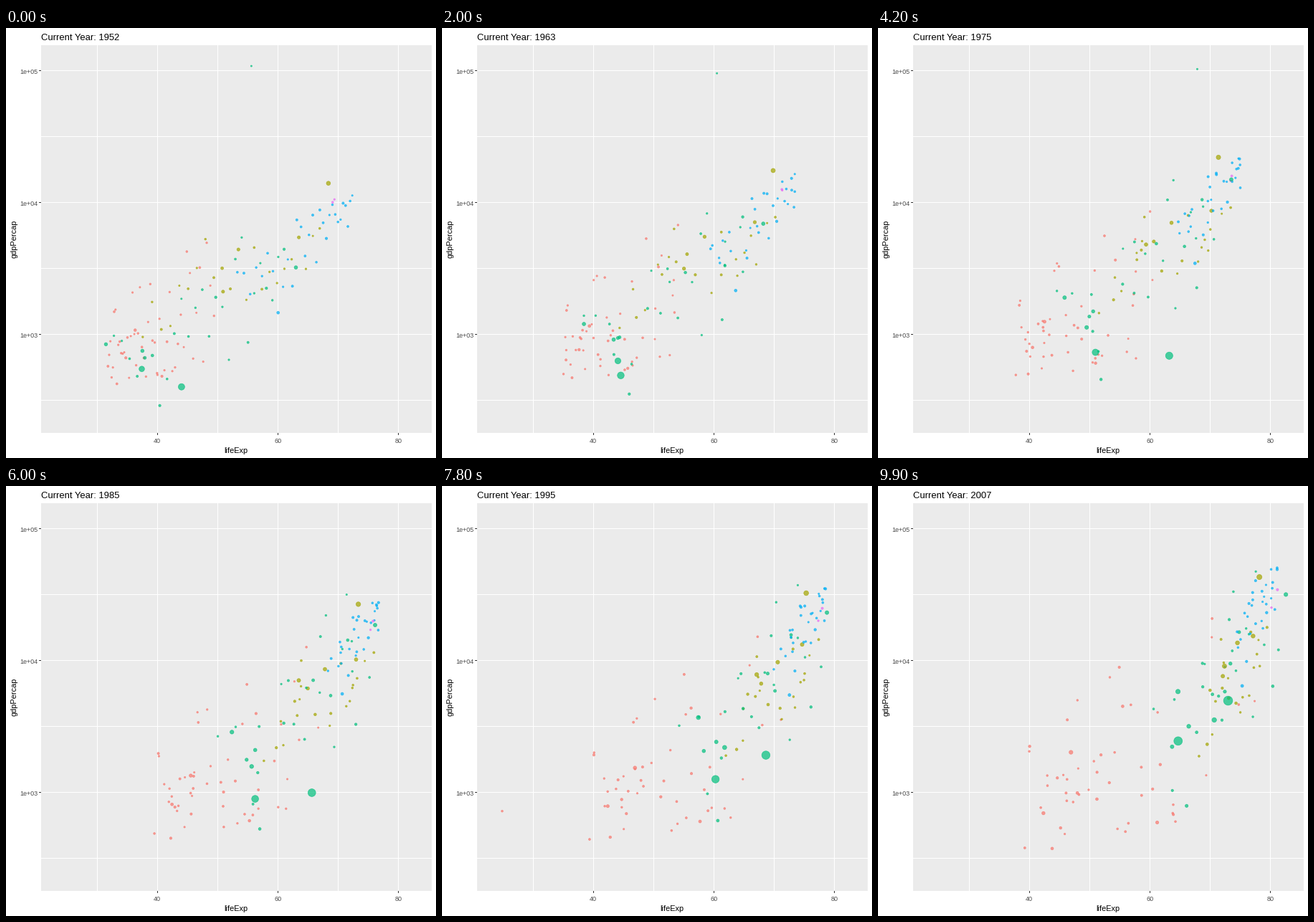
Recreate the animation shown at these times as a matplotlib script. Size 600x600 px, loop 10 s.

```python
import numpy as np
import matplotlib.pyplot as plt
from matplotlib.animation import FuncAnimation
from matplotlib.colors import to_rgba
from matplotlib.patches import Rectangle

plt.rcParams["font.family"] = "Liberation Sans"
PX = 0.72  # points per pixel at 100 dpi
FRAMES, STEP = 100, 9
YEARS = np.arange(1952, 2008, 5)
COLORS = dict(africa="#F8766D", americas="#A3A500", asia="#00BF7D",
              europe="#00B0F6", oceania="#E76BF3")
rng = np.random.default_rng(11)

life, wealth, people, tint = [], [], [], []


def add(region, pop, growth, expectancy, log_gdp):
    life.append(expectancy)
    wealth.append(log_gdp)
    people.append(np.geomspace(pop, pop * growth, len(YEARS)))
    tint.append(to_rgba(COLORS[region], 0.7))


def trend(*values):
    """Spread a few values evenly over the years."""
    return np.interp(YEARS, np.linspace(1952, 2007, len(values)), values)


def skewed(v, s):
    return (np.exp(s * v) - np.exp(s * s / 2)) / s


def cloud(region, count, pop, growth, skew, rho, mean, spread, gdp, gdp_spread):
    """Countries scattered around a regional trend, drifting slowly in rank."""
    turn = np.linspace(0, 0.6, len(YEARS))
    for rank in (np.arange(count) + 0.5) / count:
        z = 1.7 * (2 * rank - 1)
        w, drift = np.clip(rng.normal(size=2), -1.7, 1.7)
        u = z * np.cos(turn) + drift * np.sin(turn)
        v = rho * u + np.sqrt(1 - rho ** 2) * w
        size = np.clip(pop * rng.lognormal(0, 1.1), 0.1, 75)
        add(region, size, growth,
            trend(*mean) + trend(*spread) * skewed(u, skew),
            trend(*gdp) + trend(*gdp_spread) * skewed(v, skew)
            + rng.normal(0, 0.02, len(YEARS)))


def track(region, pop, growth, *points):
    """One country through a few (year, life, gdp) points."""
    when, expectancy, gdp = np.transpose(points)
    add(region, pop, growth, np.interp(YEARS, when, expectancy),
        np.interp(YEARS, when, np.log10(gdp)))


cloud("africa", 49, 3, 3.4, 0.35, 0.5, (39, 50.5, 54.5), (5, 7, 9),
      (2.98, 3.12, 3.18), (.24, .3, .4))
cloud("americas", 23, 4, 2.6, -0.1, 0.6, (53, 66, 73.5), (9, 6, 4),
      (3.5, 3.75, 3.9), (.2, .2, .26))
cloud("asia", 27, 9, 2.8, -0.1, 0.7, (47, 62.5, 71.5), (9, 8, 6.5),
      (3.12, 3.62, 3.83), (.36, .46, .48))
cloud("europe", 30, 8, 1.3, -0.35, 0.8, (64.5, 72.6, 77.6), (5.5, 2.8, 2.7),
      (3.7, 4.15, 4.36), (.26, .2, .26))

track("oceania", 8.7, 2.3, (1952, 69.1, 10040), (2007, 81.2, 34435))
track("oceania", 2, 2.1, (1952, 69.4, 10557), (2007, 80.2, 25185))
track("africa", 33, 4, (1952, 36.3, 1077), (1987, 46.9, 1385),
      (2007, 46.9, 2014))
track("africa", 2.5, 3.6, (1952, 40, 493), (1987, 44, 848),
      (1992, 23.6, 737), (1997, 36.1, 590), (2007, 46.2, 863))
track("americas", 57, 3.3, (1952, 50.9, 2109), (1982, 63.3, 7031),
      (2007, 72.4, 9066))
track("americas", 158, 1.9, (1952, 68.4, 13990), (1972, 71.3, 21806),
      (2007, 78.2, 42952))
track("asia", 0.16, 16, (1952, 55.6, 108382), (1962, 60.5, 95458),
      (1972, 67.7, 109348), (1982, 71.3, 31354), (2007, 77.6, 47307))
track("asia", 82, 2.7, (1952, 37.5, 750), (1972, 49.2, 1111),
      (2007, 70.7, 3541))
track("asia", 86, 1.5, (1952, 63, 3217), (1972, 73.4, 14779),
      (2007, 82.6, 31656))
track("asia", 372, 3, (1952, 37.4, 547), (1972, 50.7, 724),
      (1987, 58.6, 977), (2007, 64.7, 2452))
track("asia", 556, 2.37, (1952, 44, 400), (1957, 50.5, 576),
      (1962, 44.5, 488), (1972, 63.1, 677), (1982, 65.5, 962),
      (2007, 73, 4959))

X = 211.3 + 8.4 * (np.array(life) - 40)
Y = 427.5 - 184 * (np.array(wealth) - 3)
# Point size 1 to 6 by area, turned into a pixel diameter
D = 2.134 * (1 + 5 * np.sqrt(np.array(people) / 1319)) - 0.1

fig = plt.figure(figsize=(6, 6), dpi=100, facecolor="white")
ax = fig.add_axes([0, 0, 1, 1])
ax.set(xlim=(0, 600), ylim=(600, 0))
ax.axis("off")


def box(x, y, w, h, color):
    ax.add_patch(Rectangle((x, y), w, h, color=color, lw=0, zorder=0))


def label(x, y, s, size, color="black", **kw):
    return ax.text(x, y, s, fontsize=size * PX, color=color, **kw)


box(49, 24, 545, 541, "#EBEBEB")
for x in range(127, 594, 84):
    box(x, 24, 1, 541, "white")
for y in range(59, 565, 92):
    box(49, y, 545, 1, "white")
for n in range(3):
    x, y = 211 + 168 * n, 59 + 184 * n
    box(x, 565, 1, 3, "#333333")
    box(46, y, 3, 1, "#333333")
    label(x + 0.3, 579, f"{40 + 20 * n}", 9, "#4D4D4D",
          ha="center", va="baseline")
    label(44.5, y + 4.5, f"1e+0{5 - n}", 9, "#4D4D4D",
          ha="right", va="baseline")
label(321, 593, "lifeExp", 11, ha="center", va="baseline")
label(16.5, 294.5, "gdpPercap", 11, rotation=90, ha="right", va="center")
title = label(49, 17, "", 13, va="baseline")

dots = ax.scatter(X[:, 0], Y[:, 0], s=(D[:, 0] * PX) ** 2, c=tint,
                  edgecolors=tint, linewidths=0.7 * PX, zorder=2)


def draw(i):
    k, part = divmod(i, STEP)
    t = 2 ** (10 * (part / STEP - 1)) if part else 0  # exponential ease-in
    n = min(k + 1, len(YEARS) - 1)

    def mix(a):
        return a[:, k] + (a[:, n] - a[:, k]) * t

    dots.set_offsets(np.column_stack([mix(X), mix(Y)]))
    dots.set_sizes((mix(D) * PX) ** 2)
    title.set_text(f"Current Year: {round(1952 + 55 * i / (FRAMES - 1))}")
    return dots, title


anim = FuncAnimation(fig, draw, frames=FRAMES, interval=100, repeat=True,
                     repeat_delay=0, blit=False)
plt.show()
```
